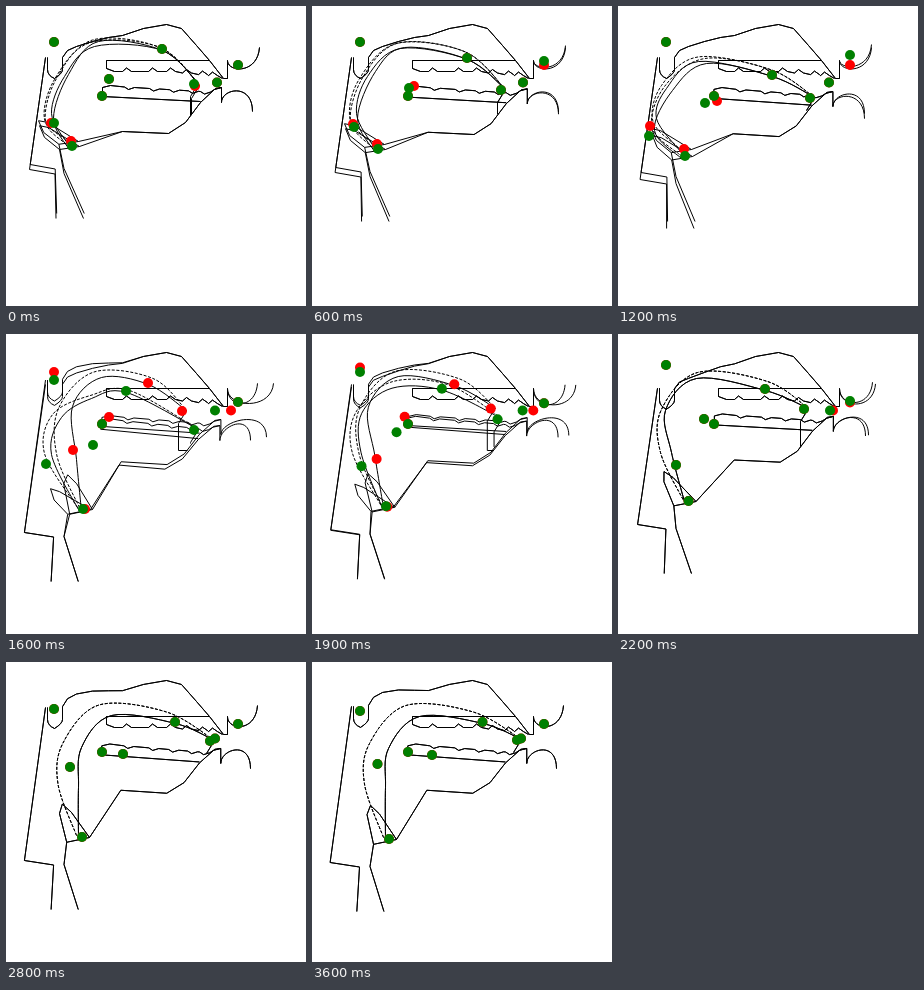
An HTML page with a canvas that plays this animation: 300x300 px, repeating every 3800 ms.

```html
<!DOCTYPE html>
<html>
<head>
<meta charset="utf-8">
<style>
html, body { margin: 0; width: 100%; height: 100%; overflow: hidden; background: #fff; }
canvas { display: block; }
</style>
</head>
<body>
<canvas id="stage" width="300" height="300"></canvas>
<script>
const LOOP = 3800, STEP = 100;
const ctx = document.getElementById('stage').getContext('2d');

// jaw: angle; lips: corner x and opening; gap: how far the midline leaves the tongue dome;
// tongue: root, back and dome. The remaining outline follows from these.
const rest = { time: 300, jaw: 0, hyoid: [66, 140], velum: 36, lips: [211, 59], gap: .5,
  throat: [48, 117], body: [156, 43], tip: [188, 78], chin: [103, 73], tongue: [[47, 112], [62, 68], [92, 35]] };
const narrow = { ...rest, time: 600, jaw: .006, hyoid: [66, 143], lips: [211, 55],
  throat: [42, 121], body: [155, 52], tip: [189, 84], chin: [97, 82], tongue: [[45, 112], [63, 65], [92, 41]] };
const low = { ...rest, time: 1200, jaw: .018, hyoid: [67, 150], lips: [211, 49], gap: .2,
  throat: [31, 130], body: [154, 69], tip: [192, 92], chin: [87, 97], tongue: [[36, 124], [54, 84], [88, 57]] };
const open = { time: 1600, jaw: .045, hyoid: [77, 175], velum: 46, lips: [209, 68], gap: .1,
  throat: [40, 130], body: [120, 57], tip: [188, 96], chin: [87, 111], tongue: [[45, 120], [55, 83], [85, 64]] };
const raised = { time: 2200, jaw: .004, hyoid: [70.5, 167], velum: 31, lips: [212, 67], gap: .5,
  throat: [58, 131], body: [147, 55], tip: [186, 75], chin: [86, 85], tongue: [[53, 118], [47, 76], [78, 44]] };
const forward = { time: 2800, jaw: .022, hyoid: [76, 175], velum: 47, lips: [209, 62], gap: .5,
  throat: [64, 105], body: [169, 60], tip: [204, 79], chin: [117, 92], tongue: [[72, 125], [75, 85], [105, 53]] };
const settled = { ...forward, time: 3400, hyoid: [77, 177], velum: 49,
  throat: [65.5, 102], body: [170.5, 60], tip: [205, 78], chin: [120, 93], tongue: [[73, 125], [76, 86], [107, 54]] };

const leading = [rest, narrow, low, open, raised, forward, settled];
const trailing = [
  { ...rest, hyoid: [65, 135], throat: [45, 117], tip: [189, 80], tongue: [[45, 107], [58, 70], [88, 40]] },
  { ...narrow, hyoid: [65, 138], lips: [211, 59], throat: [41, 118], chin: [102, 80],
    tongue: [[44, 107], [55, 70], [88, 42]] },
  { ...low, hyoid: [66, 143], lips: [211, 59], throat: [32, 120], chin: [99, 95],
    tongue: [[38, 112], [48, 82], [80, 55]] },
  { ...open, jaw: .018, hyoid: [79, 175], velum: 38, lips: [225, 68], gap: .5, throat: [67, 116], body: [142, 49],
    tip: [176, 77], chin: [103, 83], tongue: [[70, 125], [66, 72], [95, 43]] },
  { ...raised, lips: [215, 68.5] }, forward, settled
];

// Cubic interpolation through the poses, at rest at both ends.
function poseAt(list, time) {
  time = Math.min(Math.max(time, list[0].time), list.at(-1).time);
  const i = Math.min(list.findLastIndex(p => p.time <= time), list.length - 2);
  const a = list[i], b = list[i + 1], before = list[i - 1], after = list[i + 2];
  const span = b.time - a.time, u = (time - a.time) / span, ease = u * u * (3 - 2 * u);
  const leave = before ? u * (1 - u) ** 2 * span / (b.time - before.time) : 0;
  const arrive = after ? u * u * (1 - u) * span / (after.time - a.time) : 0;
  const mix = (p, v, w, n) => Array.isArray(v) ? v.map((_, k) => mix(p[k], v[k], w[k], n[k])) :
    v + (w - v) * ease + (w - p) * leave - (n - v) * arrive;
  return Object.fromEntries(Object.keys(a).map(key =>
    [key, mix((before || a)[key], a[key], b[key], (after || b)[key])]));
}

function line(points) {
  ctx.beginPath();
  points.forEach(p => ctx.lineTo(...p));
  ctx.stroke();
}

// Adds a Catmull-Rom curve to the current path.
function curve(points) {
  ctx.beginPath();
  ctx.moveTo(...points[0]);
  for (let i = 0; i < points.length - 1; i++) {
    const p = points[i], q = points[i + 1], before = points[i - 1] || p, after = points[i + 2] || q;
    ctx.bezierCurveTo(p[0] + (q[0] - before[0]) / 6, p[1] + (q[1] - before[1]) / 6,
      q[0] - (after[0] - p[0]) / 6, q[1] - (after[1] - p[1]) / 6, ...q);
  }
}

// Teeth are flat crowns with a notch at every gap.
const upperTeeth = [120, 146, 164, 180, 196, 206].flatMap(x => {
  const y = 65 + Math.max(0, x - 165) * .1;
  return [[x - 4, y], [x, y - 3.5], [x + 5, y]];
});
const lowerTeeth = [122, 147, 167, 186, 198].flatMap(x => {
  const y = 83 + (x - 122) * .06;
  return [[x - 4, y - 2.5], [x, y], [x + 6, y - 2]];
});

function drawPalate({ velum, lips: [corner, opening] }) {
  const lift = (velum - 36) / 11, top = 51 - 6 * lift, d = opening - 59;
  const lipEnd = 41 + .6 * d + .03 * d * d;
  const roof = [[56, 51], [61, 44], [70, 40], [86, 35], [102, 31], [116, 29], [137, 22], [160, 18], [175, 22],
    [190, 39], [203, 54], [217, 72], [221, 72], [221, 54]];
  ctx.beginPath();
  ctx.moveTo(41, top);
  ctx.lineTo(41, top + 12);
  ctx.quadraticCurveTo(41, top + 18, 48, top + 21);
  ctx.quadraticCurveTo(56, top + 16, 56, top + 12);
  roof.forEach(([x, y]) => ctx.lineTo(x, y - lift * 8.5 * Math.exp(-(((x - 70) / 30) ** 2))));
  ctx.bezierCurveTo(221, lipEnd + 25, corner + 40, lipEnd + 27, corner + 42, lipEnd);
  ctx.stroke();
  line([[203, 54], [100, 54], [100, 62], [108, 65], ...upperTeeth, [216, 72]]);
}

function drawThroat({ hyoid: [hx, hy], velum, throat }) {
  const drop = hy - 140, base = [hx - 13 - drop * .08, hy + 3 + drop * .05];
  line([[39, 51 - 6 * (velum - 36) / 11], [23 - drop * .145, hy + 23], [48.5 - drop * .04, hy + 27.5],
    [49.5 - drop * .14, hy + 72]]);
  line([base, [57.5, hy + 27], [77 - drop * .15, hy + 72]]);

  // The epiglottis swings up as the tongue root moves forward.
  const reach = -33 + Math.max(0, throat[0] - 48) * .8;
  const x = hx + reach, y = hy - Math.sqrt(39 ** 2 - reach ** 2), lean = x - base[0] + 2;
  line([[x, y], [x - 4 - lean * .5, y + 9 - lean * .15], base, [hx + 7, hy], [x + 9, y + 9 + lean * .4], [x, y]]);
}

function drawJaw({ jaw, hyoid: [hx, hy], lips: [corner, opening] }) {
  const sin = Math.sin(jaw), cos = Math.cos(jaw);
  const turn = ([x, y]) => [(x + 10) * cos - (y - 50) * sin - 10, (x + 10) * sin + (y - 50) * cos + 50];
  const lipEnd = 105 + (59 - opening) * .5 + jaw * 120, [x, y] = turn([215, 81]);
  line([[hx + 7, hy], ...[[116, 125], [162, 127], [179, 116], [194, 96], [209, 82], [215, 81]].map(turn)]);
  line([[194, 95], [96, 90], [96, 81], [104, 79], ...lowerTeeth, [208, 83], [215, 81]].map(turn));
  ctx.beginPath();
  ctx.moveTo(x, y);
  ctx.lineTo(x, y + 15);
  ctx.bezierCurveTo(x, y + 1, corner + 35, lipEnd - 29, corner + 35, lipEnd);
  ctx.stroke();
}

function drawTongue({ hyoid: [hx, hy], tongue, body, tip, gap }) {
  const end = [tip[0] + 4, tip[1] - 1], under = [end[0] - 8, end[1] + 13];
  const floor = Math.max(under[1], 116 - Math.max(0, under[0] - 179) * 1.4);
  const outline = [[hx - 4, hy + 2], ...tongue, [body[0], body[1] + 1], end];
  curve(outline);
  ctx.lineTo(...under);
  ctx.lineTo(under[0], floor);
  ctx.lineTo(Math.max(under[0], 181), floor);
  ctx.stroke();

  // The airway midline lies between the tongue and the opposite wall.
  const wall = [[hx - 8, hy - 6], [31, 118], [38, 76], [80, 32], [151, 38], end];
  ctx.setLineDash([3, 1.6]);
  curve(outline.map((p, i) => p.map((v, k) => v + (wall[i][k] - v) * (i < 3 ? .5 : gap))));
  ctx.stroke();
  ctx.setLineDash([]);
}

function drawDots({ hyoid, velum, lips: [corner, opening], throat, body, tip, chin }, color) {
  ctx.fillStyle = color;
  for (const [x, y] of [hyoid, [48, velum], [corner, 76.5], [232, opening], [96, 90], throat, body, tip, chin]) {
    ctx.beginPath();
    ctx.arc(x, y, 5, 0, 2 * Math.PI);
    ctx.fill();
  }
}

function frame() {
  const time = Math.floor(performance.now() % LOOP / STEP) * STEP;
  const front = poseAt(leading, time), back = poseAt(trailing, time);
  ctx.fillStyle = '#fff';
  ctx.fillRect(0, 0, 300, 300);
  ctx.setTransform(1, 0, 0, 1, .5, .5);
  for (const pose of [back, front]) {
    for (const part of [drawPalate, drawThroat, drawJaw, drawTongue]) part(pose);
  }
  ctx.setTransform(1, 0, 0, 1, 0, 0);
  drawDots(back, '#f00');
  drawDots(front, '#008000');
  requestAnimationFrame(frame);
}
frame();
</script>
</body>
</html>
```
